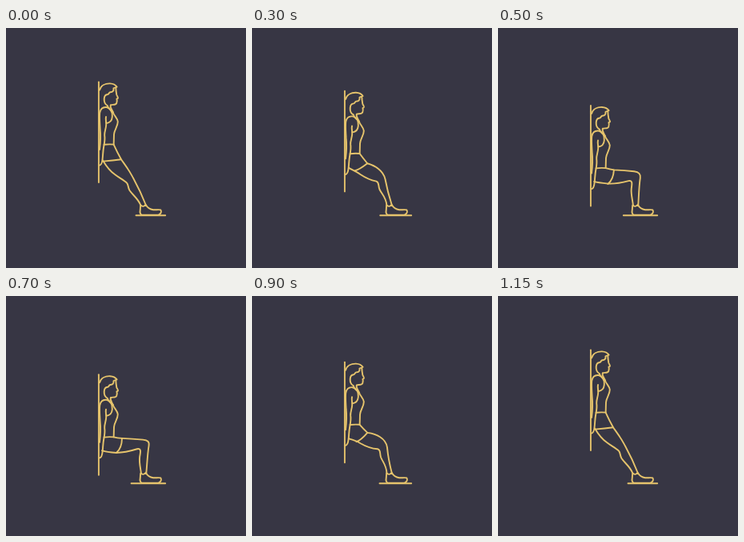
Animation, 300 px wide and 300 px high, one loop 1250 ms. Source, as an HTML page:

```html
<!DOCTYPE html>
<html lang="en">
<head>
<meta charset="utf-8">
<title>Wall sit</title>
<style>
  html, body { margin: 0; height: 100%; overflow: hidden; background: #373644; }
  svg { display: block; width: 100%; height: 100%; }
  path { fill: none; stroke: #e6c46c; stroke-width: 1.9; stroke-linecap: round; stroke-linejoin: round; }
</style>
</head>
<body>
<svg viewBox="0 0 300 300">
  <g id="body">
    <path d="M115.9 67.4V193"/>
    <!-- hair, face, neck -->
    <path d="M117 77.5C118.6 72 124 69.2 130 69.4C134 69.6 136.8 71 138.6 73.6C137 74.6 135.6 74.6 134.4 75.4C135 78.4 133.5 80 130.4 80.2C128.6 80.6 128.8 82.6 127 83C123.6 83.4 122.9 85.4 122.7 88.4C122.4 92.5 124.2 95.6 126.8 97C127.6 100.6 130.8 103 133.8 105.2"/>
    <path d="M137.4 75.5C137.4 79 138 81.5 138.3 83.5C139 85.2 140.6 87 139.9 87.8L138.4 88.6C139 90 138.8 92 138.2 94C137 96.6 133.5 95.4 130.8 96.2C129.6 99.5 132.8 102 134 106"/>
    <!-- arm -->
    <path d="M117 152C118.2 142 118.4 134 117.6 126C117.2 118 116.6 112 117.2 106C118.2 100.5 121.6 98.6 125.6 99C130.6 100 133.2 105 132.8 111C132.4 115.5 130 118.6 125.4 119"/>
    <path d="M125 111C124.2 114 125.4 117 125.2 121C125 126 122.8 130 123.2 134C123.8 138 123.4 142 122.4 147C121.2 153 121.2 159 120.6 164C120.2 168 119.2 171 117 171.6"/>
    <!-- torso -->
    <path d="M134 106C135.6 110 139.4 113 139.8 117C139.8 123 135.4 127 135 133C134.8 138 134.8 142 134.6 145.6C130 145.2 126 145.4 122.6 145.8"/>
  </g>
  <g id="legs"></g>
  <path d="M168.3 221.4C170.5 223.8 172.6 223 174.6 220.8C176.6 224.2 180 226.8 184 227.2C188 227.4 191 226.8 193.4 227.4C195 230 193.4 232.4 190.5 233.6H170C167.6 233 167.2 230 167.8 227C168 225 167.8 223.4 168.3 221.4Z"/>
  <path id="floor"/>
</svg>
<script>
const LOOP = 1250, STEP = 50, LAST = 1150;
const START = 35, LOW = 630, END = 1165;
const DROP = 31.2, MID = 0.37;

// Each leg line standing, part way down and seated.
const lines = [
  [ // hip, thigh and shin, front
    "M134.6 145.6C137.5 152 140.5 158 144 164.3C147 168.5 150 172.5 152.5 176.5C155 180 157 184 159 187.5C165 198.5 170 209 174.5 220.5",
    "M134.6 157.2C137.5 161.2 141 165.5 144.2 169.3C148.5 170.5 154 172.6 158 176C162.5 179.5 165.5 184 166.6 189C168.6 200 171.5 211 174.7 221",
    "M134.6 176.8C138 177.6 141 177.9 145 178.1C154 178.6 164 179.3 171.5 179.8C177.5 180.3 179.7 182 178.8 187C177 198 176.5 210 175.3 222"
  ],
  [ // thigh and calf, back
    "M121 165.5C125.5 173 130 179 136 183C141 187 147.5 190 151 193.6C153.5 196.5 152 199 154.5 203C158.5 209 165 213 168.3 221.4",
    "M121 174.8C125 177.5 130 179 135.5 183C142 187.4 149 190.3 155.5 191.6C159.5 193 157.4 197 159.6 202C162.5 208 167.5 211 168.5 222",
    "M120 193.6C124 195.1 130 196.1 138 196.4C147 196.1 156 193.8 164 191.3C169.5 189.8 168.5 195 167.3 201C166.3 208 168 215 169 222"
  ],
  [ // shorts hem
    "M121.6 166.6C129 166 137 165.2 144 164.3",
    "M128.5 178.6C134 177.4 139.5 173 144.2 169.3",
    "M138 196.4C142 193 145 186 145 178.1"
  ]
];

const body = document.getElementById("body");
const legs = document.getElementById("legs");
const floor = document.getElementById("floor");
const numbers = d => d.match(/[\d.]+/g).map(Number);

const parts = lines.map(poses => {
  const path = document.createElementNS("http://www.w3.org/2000/svg", "path");
  legs.append(path);
  return { path, shape: poses[0], poses: poses.map(numbers) };
});

function ease(u) {
  u = Math.min(1, Math.max(0, u));
  const half = v => 0.5 * (2 * v) ** 2.7;
  return u < 0.5 ? half(u) : 1 - half(1 - u);
}

function depth(t) {
  return t < LOW ? ease((t - START) / (LOW - START)) : 1 - ease((t - LOW) / (END - LOW));
}

// Quadratic through the three poses at 0, MID and 1.
function blend(p, a, b, c) {
  return a * (p - MID) * (p - 1) / MID
    + b * p * (1 - p) / (MID * (1 - MID))
    + c * p * (p - MID) / (1 - MID);
}

function draw(t) {
  const p = depth(t);
  body.setAttribute("transform", `translate(0 ${(DROP * p).toFixed(3)})`);
  for (const { path, shape, poses: [a, b, c] } of parts) {
    let i = 0;
    path.setAttribute("d", shape.replace(/[\d.]+/g, () => {
      const v = blend(p, a[i], b[i], c[i]);
      i++;
      return v.toFixed(2);
    }));
  }
  floor.setAttribute("d", `M${blend(p, 162.5, 160.2, 156.5).toFixed(2)} 234.2H199.2`);
}

function tick() {
  const t = performance.now() % LOOP;
  draw(Math.min(LAST, Math.floor(t / STEP) * STEP));
  requestAnimationFrame(tick);
}
tick();
</script>
</body>
</html>
```
